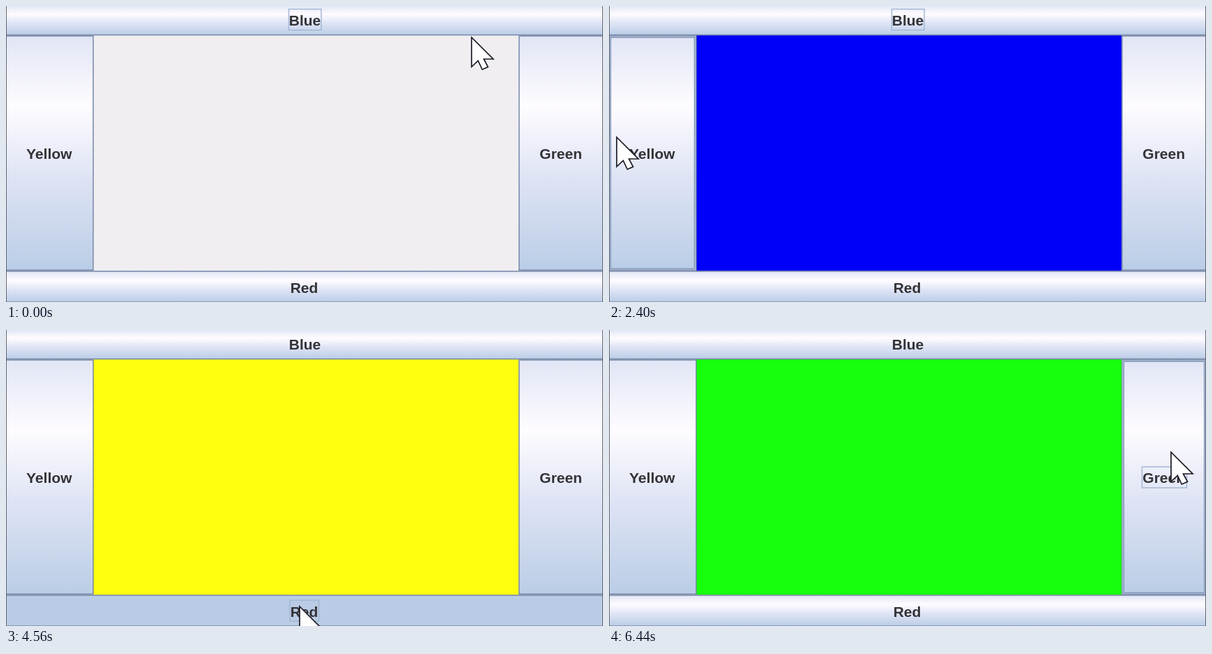
Animation, 854 px wide and 424 px high, one loop 7.24 s. Source, as an HTML page:

```html
<!DOCTYPE html>
<html lang="en">
<head>
<meta charset="utf-8">
<title>Border layout colours</title>
<style>
html, body { margin: 0; width: 100%; height: 100%; overflow: hidden; background: #f0eef1; }
svg { display: block; width: 100vw; height: 100vh; }
text { font: bold 21px "Liberation Sans", Arial, sans-serif; fill: #333336; text-anchor: middle; }
</style>
</head>
<body>
<svg id="stage" viewBox="0 0 854 424">
  <defs>
    <linearGradient id="metal" x1="0" y1="0" x2="0" y2="1">
      <stop offset="0" stop-color="#e1e5f5"/>
      <stop offset=".3" stop-color="#fefcff"/>
      <stop offset=".6" stop-color="#dfe4f5"/>
      <stop offset="1" stop-color="#bacde6"/>
    </linearGradient>
  </defs>
  <rect id="panel" x="125" y="42" width="608.5" height="337.5"/>
  <g id="buttons"></g>
  <path d="M.5 0V424M853.5 0V424" stroke="#62666f" stroke-width="1"/>
  <path id="cursor" d="M0 0V42L9.3 33.3L15.3 46L23.5 42.4L17.5 31H31Z"
    fill="#fff" stroke="#1d1b26" stroke-width="1.7" stroke-linejoin="miter"/>
</svg>
<script>
const LOOP = 7240, STEP = 40, HOLD = 160;
const NS = "http://www.w3.org/2000/svg";
const $ = id => document.getElementById(id);

function add(parent, tag, attrs) {
  const el = document.createElementNS(NS, tag);
  for (const k in attrs) el.setAttribute(k, attrs[k]);
  return parent.appendChild(el);
}

// box: x, y, w, h; label: centre x, baseline; focus: x, y, w
const specs = [
  { name: "Blue", box: [0, -1, 854, 42.5], label: [427.5, 28], focus: [404.5, 4.5, 46.5] },
  { name: "Yellow", box: [0, 43, 124.7, 335.3], label: [61.7, 219.3], focus: [27.5, 196, 69] },
  { name: "Green", box: [734, 43, 120, 335.3], label: [793.7, 219.3], focus: [762.5, 196, 64] },
  { name: "Red", box: [0, 380, 854, 44], label: [426.5, 410.5], focus: [406, 387, 41.5] }
];

function makeButton({ name, box: [x, y, width, height], label, focus }) {
  const g = add($("buttons"), "g", {});
  const face = add(g, "rect", { x, y, width, height, stroke: "#7787a6", "stroke-width": 1.5 });
  const glow = add(g, "g", { fill: "none" });
  add(glow, "rect", { x: x + 1.3, y: y + 1.3, width: width - 2.6, height: height - 2.6,
    stroke: "#b9cce5", "stroke-width": 1.4 });
  add(glow, "rect", { x: x + 2.4, y: y + 2, width: width - 4.8, height: height - 4,
    stroke: "#8497b8", "stroke-width": 1.5 });
  const ring = add(g, "rect", { x: focus[0], y: focus[1], width: focus[2], height: 30,
    fill: "none", stroke: "#a0b6d3", "stroke-width": 1.4 });
  add(g, "text", { x: label[0], y: label[1] }).textContent = name;
  const inside = (px, py) => px >= x && px < x + width && py >= y && py < y + height;
  return { name, face, glow, ring, inside };
}
const buttons = specs.map(makeButton);

const clicks = [
  { at: 1360, name: "Blue", color: "#0000f8" },
  { at: 3040, name: "Yellow", color: "#ffff10" },
  { at: 4480, name: "Red", color: "#e60000" },
  { at: 6000, name: "Green", color: "#16ff0c" }
];

const easeIn = p => p * p;
const easeOut = p => 1 - (1 - p) ** 2;
const easeBoth = p => p * p * (3 - 2 * p);
const linear = p => p;

// start, end, target x, target y, easing
const moves = [
  [0, 760, 422, 28, easeBoth],
  [1960, 2000, 410, 38, linear],
  [2000, 2400, 11, 188, easeBoth],
  [2560, 2720, 39, 185, easeBoth],
  [3360, 3720, 315, 382, easeIn],
  [3720, 4080, 420, 396, easeOut],
  [4920, 5240, 804, 175, easeBoth]
];

function pointer(t) {
  let x = 666, y = 45;
  for (const [from, to, tx, ty, ease] of moves) {
    if (t <= from) break;
    const p = ease(Math.min(1, (t - from) / (to - from)));
    x += (tx - x) * p;
    y += (ty - y) * p;
  }
  return [x, y];
}

function show(el, on) { el.setAttribute("visibility", on ? "visible" : "hidden"); }

function draw(t) {
  const [x, y] = pointer(t);
  let focus = "Blue", pressed = "", color = "#f0eef1";
  for (const c of clicks) {
    if (t < c.at) break;
    focus = c.name;
    if (t < c.at + HOLD) pressed = c.name;
    else color = c.color;
  }
  $("panel").setAttribute("fill", color);
  for (const b of buttons) {
    const down = b.name === pressed;
    b.face.setAttribute("fill", down ? "#bacce5" : "url(#metal)");
    show(b.glow, !down && b.inside(x, y));
    show(b.ring, b.name === focus);
  }
  $("cursor").setAttribute("transform", `translate(${x} ${y})`);
}

const start = performance.now();
function tick() {
  const t = (performance.now() - start) % LOOP;
  draw(Math.floor(t / STEP) * STEP);
  requestAnimationFrame(tick);
}
draw(0);
requestAnimationFrame(tick);
</script>
</body>
</html>
```
